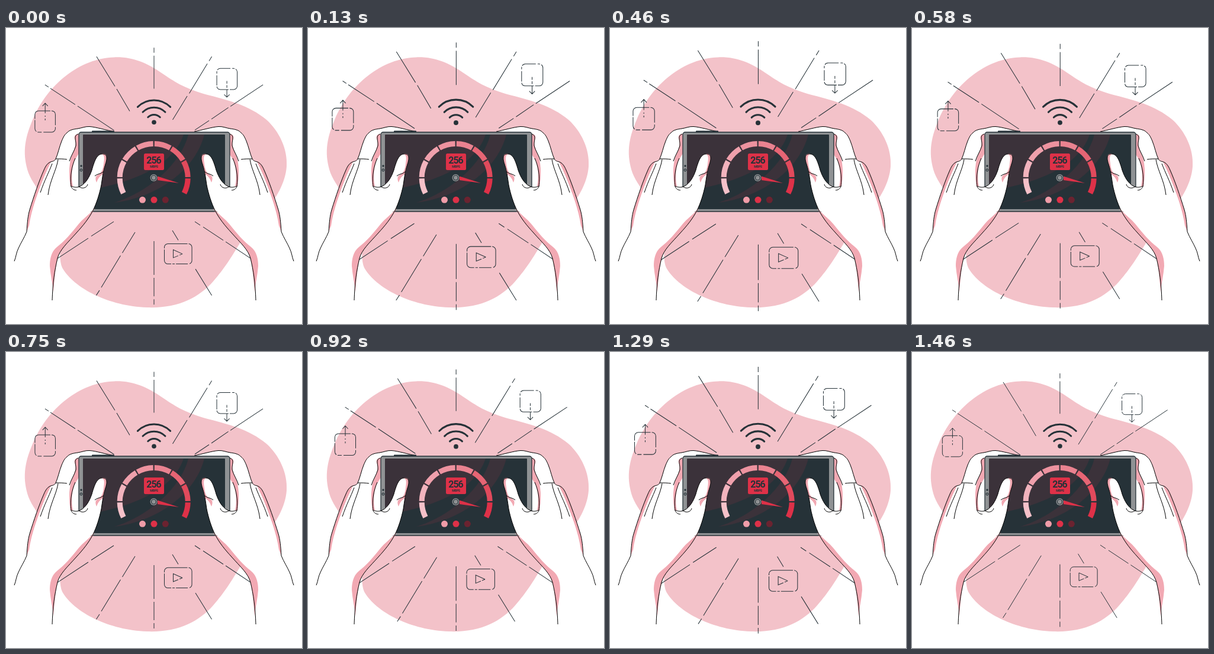
These frames come from a looping animation (500x500 px, 1500 ms). An HTML page with a canvas:

```html
<!DOCTYPE html>
<html lang="en">
<head>
<meta charset="utf-8">
<title>Speed test</title>
<style>
html, body { margin: 0; width: 100%; height: 100%; overflow: hidden; background: #fff; }
canvas { display: block; width: 500px; height: 500px; }
</style>
</head>
<body>
<canvas id="stage" width="500" height="500"></canvas>
<script>
const ctx = document.getElementById('stage').getContext('2d');
const LOOP = 1500;
const INK = '#263238', RED = '#de3148', SHADE = '#f2a9b3', BLOB = '#f3c2c9';

const shape = d => new Path2D(d);

const blob = shape('M183 49.4C215 48.5 238 59.5 262 75.5C285 91 300 101 335 111.5C375 122 410 130 440 155C462 175 476 205 474 234C472 262 455 290 440 306C425 322 410 340 396 362C380 388 370 405 350 428C325 456 290 474 238 472C175 470 115 440 95 405C85 380 100 340 90 320C80 300 50 275 38 245C28 215 30 190 45 155C70 95 125 51 183 49.4Z');

const rays = shape(
  'M250 33.5V42M250 47V102.5M250 360V417M250 422V453M250 458V467' +
  'M153 48.5L184 98.5M187 103L209 140.5M347.5 48.5L343 56M340 60.5L309.5 110.5M306 115L281.5 155' +
  'M66 96L72 100M75 102L117 129.5M121 132L182.5 173' +
  'M434 96L379 132.5M375.5 134.5L347 154M343 156.5L319 172.5' +
  'M182 327L144 351.5M139 355L66 403M319 327L328 333M333 336L367 358.5M371 361L434 403' +
  'M218 345L196.5 380M193.5 384.5L161 438M158 443L152.5 451.5' +
  'M281 342L291 358.5M320 407L347.5 451.5');

const arrows = shape(
  'M66.3 127.5V144M66.3 148V150M66.3 153V156M61.8 132L66.3 127L70.8 132' +
  'M373 89.5V94M373 96.5V101M373 104V117M368.5 112.5L373 117L377.5 112.5' +
  'M298 381.5L282.5 374.5V388L291 384.5M293 383.5L298 381.5');

// Left hand; the right one is its mirror image.
const outerLine = 'M14 394C17 387 17 380 21 372C25 363 31 354 35 344C36 328 37 317 40 307C47 284 56 258 64 240C67 233 70 228 76 226C79 225 82 225 84 221C88 212 90 201 94 191C97 184 99 180 103 177C107 172 114 171 121 170C128 169 134 166 141 166.5C151 167 171 173 182 175';
const palmLine = 'C140 322 130 334 119 346C104 363 91 374 87 389C82 410 79 430 78 460';
const hand = {
  back: shape(outerLine + 'L124 180V270L150 305' + palmLine + 'H14Z'),
  outline: shape(outerLine),
  outerShade: shape('M35 344C36 328 37 317 40 307C47 284 56 258 64 240C67 233 70 228 76 226C66 246 59 264 52 284C45 304 41 320 39 334Z'),
  fingerShade: shape('M123 179C116 179 114 183 117 190C119 198 115 208 110 218C106 234 106 252 109 268L113 268C110 252 111 238 115 225L123 212Z'),
  palmShade: shape('M150 304C140 316 130 322 122 332C111 346 98 361 86 370C76 378 74 391 74 402C75 417 79 432 80 446C82 420 84 402 87 389C91 374 104 363 119 346C130 334 141 322 150 304Z'),
  creases: shape('M78 229C72 245 65 257 58 278M88 222C85 241 74 257 71 282M84 221C91 221 97 221 103 222M122 179C113 182 119 190 118 199C115 209 110 215 107 225M117 220C111 234 108 249 110 267'),
  thumb: shape('M147 308C153 296 158 280 161 265C163 252 164 241 168 230C173 215 168 212 161 213C153 214 149 226 145 240C141 252 135 262 126 267C119 271 113 268 109 267L100 295L110 332Z'),
  thumbShade: shape('M162 213C170 211 172 217 168 230C166 237 165 242 164 247C160 249 156 252 153 261C150 254 151 249 157 247C163 243 164 236 165 229C166 221 167 215 162 213Z'),
  thumbLine: shape('M78 460C79 430 82 410 87 389C91 374 104 363 119 346C130 334 140 322 147 308C153 296 158 280 161 265C163 252 164 241 168 230C173 215 168 212 161 213C153 214 149 226 145 240C141 252 135 262 126 267C119 271 113 268 109 267M150 250C154 246 160 247 164 243M123 268C130 273 137 269 138 264M110 268C112 272 115 274 119 274')
};

function fill(path, color) {
  ctx.fillStyle = color;
  ctx.fill(path);
}

function stroke(path, color = '#000', width = 1) {
  ctx.strokeStyle = color;
  ctx.lineWidth = width;
  ctx.stroke(path);
}

function box(x, y, w, h, r) {
  const p = new Path2D();
  p.roundRect(x, y, w, h, r);
  return p;
}

function disc(x, y, r) {
  const p = new Path2D();
  p.arc(x, y, r, 0, Math.PI * 2);
  return p;
}

function label(text, x, y, size, tracking) {
  ctx.fillStyle = INK;
  ctx.textAlign = 'center';
  ctx.font = `700 ${size}px Roboto, sans-serif`;
  ctx.letterSpacing = tracking + 'px';
  ctx.fillText(text, x, y);
}

function scaledAbout(x, y, k, draw) {
  ctx.save();
  ctx.translate(x, y);
  ctx.scale(k, k);
  ctx.translate(-x, -y);
  draw();
  ctx.restore();
}

function mirrored(draw) {
  draw();
  ctx.save();
  ctx.translate(500, 0);
  ctx.scale(-1, 1);
  draw();
  ctx.restore();
}

// Two uneven beats per loop: [time, amount]
const beats = [[-40, 0], [270, 1], [822, 0], [1135, 1], [1460, 0], [1770, 1]];

function pulse(t) {
  const i = beats.findIndex(b => b[0] > t);
  const [t0, a] = beats[i - 1], [t1, b] = beats[i];
  return (1 + 0.1 * (a + (b - a) * (t - t0) / (t1 - t0))) / 1.0125;
}

function drawBurst() {
  stroke(rays, INK);
  stroke(arrows, INK);
  const frames = [
    [49, 140, 34.5, 36, [20, 2, 28, 3, 26, 3, 7, 2]],
    [356, 68.5, 34.5, 35.5, [17, 3, 4, 2, 45, 2, 22, 2]],
    [267.5, 364.3, 46.5, 34.2, [33, 2, 38, 3, 20, 2, 4, 2]]
  ];
  for (const [x, y, w, h, dash] of frames) {
    ctx.setLineDash(dash);
    stroke(box(x, y, w, h, 6), INK);
  }
  ctx.setLineDash([]);
}

function drawWifi() {
  ctx.lineCap = 'round';
  for (const r of [14.5, 26.8, 39]) {
    const p = new Path2D();
    p.arc(250, 161, r, -Math.PI * 0.75, -Math.PI * 0.25);
    stroke(p, INK, 3);
  }
  ctx.lineCap = 'butt';
  fill(disc(250, 159.3, 3.8), INK);
}

function drawGauge() {
  const colors = ['#f5c1c9', '#f2b3bd', '#efa0ac', '#ed929f', '#ea8290', '#e66574', '#e14a5c', RED];
  colors.forEach((color, i) => {
    const from = Math.max(152, 150 + i * 30) + 1.1;
    const to = Math.min(388, 180 + i * 30) - 1.1;
    const p = new Path2D();
    p.arc(249.7, 253, 57.5, from * Math.PI / 180, to * Math.PI / 180);
    stroke(p, color, 9);
  });
  fill(shape('M256 250.5L292 262L256 257Z'), RED);
  fill(disc(249.5, 253, 6), '#8f9294');
  stroke(disc(249.5, 253, 4), INK, 1.2);

  fill(box(233, 212, 34, 28, 2.5), RED);
  label('256', 249.5, 228.7, 16, -1);
  label('MBPS', 250, 236, 5.3, -0.3);

  fill(disc(230.5, 290.3, 5.5), '#f09ca8');
  fill(disc(250, 290.3, 5.5), RED);
  fill(disc(269.3, 290.3, 5.5), '#6b2330');
}

function drawPhone() {
  fill(box(145, 173.5, 38, 4, 1), INK);
  const body = box(123, 176, 255, 134, 4);
  fill(body, '#8f9294');
  stroke(body, INK, 1.3);
  fill(box(130, 180, 240, 126, 1), INK);
  const tint = 'rgba(222,49,72,.11)';
  fill(shape('M130 180H300C285 225 230 260 130 275Z'), tint);
  fill(shape('M308 180H335C322 234 263 285 183 295C242 277 296 228 308 180Z'), tint);
  fill(disc(127, 233, 1.7), INK);
  stroke(disc(127, 240, 1.8), INK, 1.2);
  drawGauge();
}

function drawHandBack() {
  fill(hand.back, '#fff');
  fill(hand.outerShade, SHADE);
  fill(hand.fingerShade, SHADE);
  stroke(hand.outline);
  stroke(hand.creases);
}

function drawThumb() {
  fill(hand.thumb, '#fff');
  fill(hand.thumbShade, SHADE);
  fill(hand.palmShade, SHADE);
  stroke(hand.thumbLine);
}

function render(now) {
  const k = pulse(now % LOOP);
  ctx.fillStyle = '#fff';
  ctx.fillRect(0, 0, 500, 500);
  fill(blob, BLOB);
  scaledAbout(241.5, 250, k, drawBurst);
  scaledAbout(250, 142, k, drawWifi);
  mirrored(drawHandBack);
  drawPhone();
  mirrored(drawThumb);
}

const start = performance.now();
function tick() {
  render(performance.now() - start);
  requestAnimationFrame(tick);
}
tick();
</script>
</body>
</html>
```
